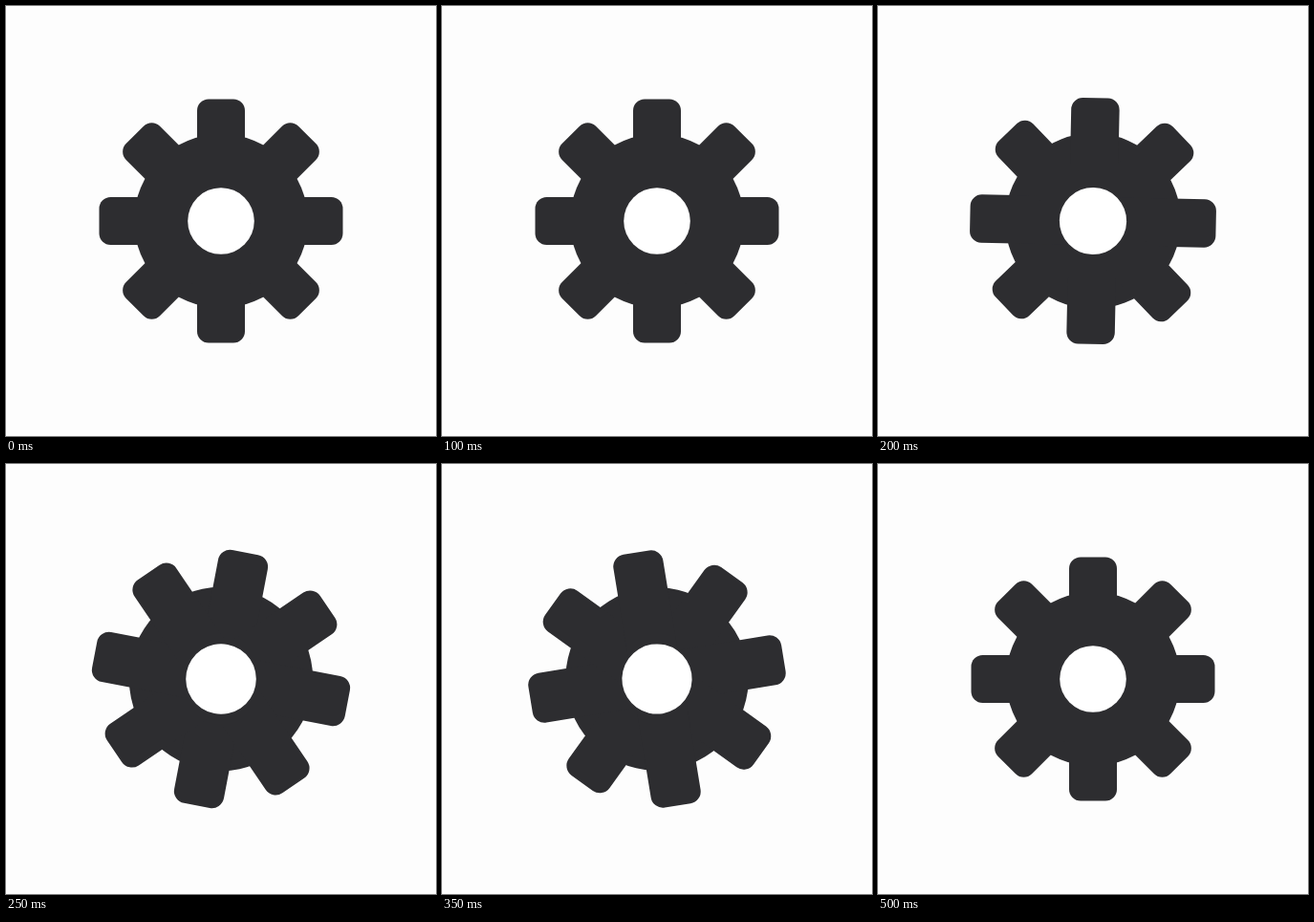
An HTML page with a canvas that plays this animation: 450 px wide and 450 px high, repeating every 550 ms.

```html
<!DOCTYPE html>
<html lang="en">
<head>
<meta charset="utf-8">
<title>Turning gear</title>
<style>
  html, body { margin: 0; width: 100%; height: 100%; overflow: hidden; background: #fdfdfd; }
  canvas { display: block; width: 450px; height: 450px; }
</style>
</head>
<body>
<canvas id="stage" width="450" height="450"></canvas>
<script>
const ctx = document.getElementById('stage').getContext('2d');
const SIZE = 450, LOOP = 550, STEP = 50;
const TURN_START = 193, TURN_END = 400;
const TEETH = 8, PITCH = 2 * Math.PI / TEETH;
const GEAR = { body: 91, hole: 34.8, tip: 127.5, toothWidth: 50, corner: 12 };

function disc(radius, color) {
  ctx.fillStyle = color;
  ctx.beginPath();
  ctx.arc(0, 0, radius, 0, 2 * Math.PI);
  ctx.fill();
}

function bar() {
  const { tip, toothWidth, corner } = GEAR;
  ctx.beginPath();
  ctx.roundRect(-toothWidth / 2, -tip, toothWidth, 2 * tip, corner);
  ctx.fill();
}

// Gentle ease in and out around a constant turning speed.
function ease(p) {
  return p - 0.035 * Math.sin(2 * Math.PI * p);
}

function draw(time) {
  const p = Math.min(1, Math.max(0, (time - TURN_START) / (TURN_END - TURN_START)));
  const scale = 1 + 0.071 * 4 * p * (1 - p);

  ctx.fillStyle = '#fdfdfd';
  ctx.fillRect(0, 0, SIZE, SIZE);
  ctx.save();
  ctx.translate(SIZE / 2, SIZE / 2);
  ctx.scale(scale, scale);
  ctx.rotate(ease(p) * PITCH);
  disc(GEAR.body, '#2d2d30');
  // Each bar spans two opposite teeth.
  for (let i = 0; i < TEETH / 2; i++) {
    bar();
    ctx.rotate(PITCH);
  }
  disc(GEAR.hole, '#fff');
  ctx.restore();
}

const start = performance.now();
function tick() {
  const time = (performance.now() - start) % LOOP;
  draw(Math.floor(time / STEP) * STEP);
  requestAnimationFrame(tick);
}
tick();
</script>
</body>
</html>
```
